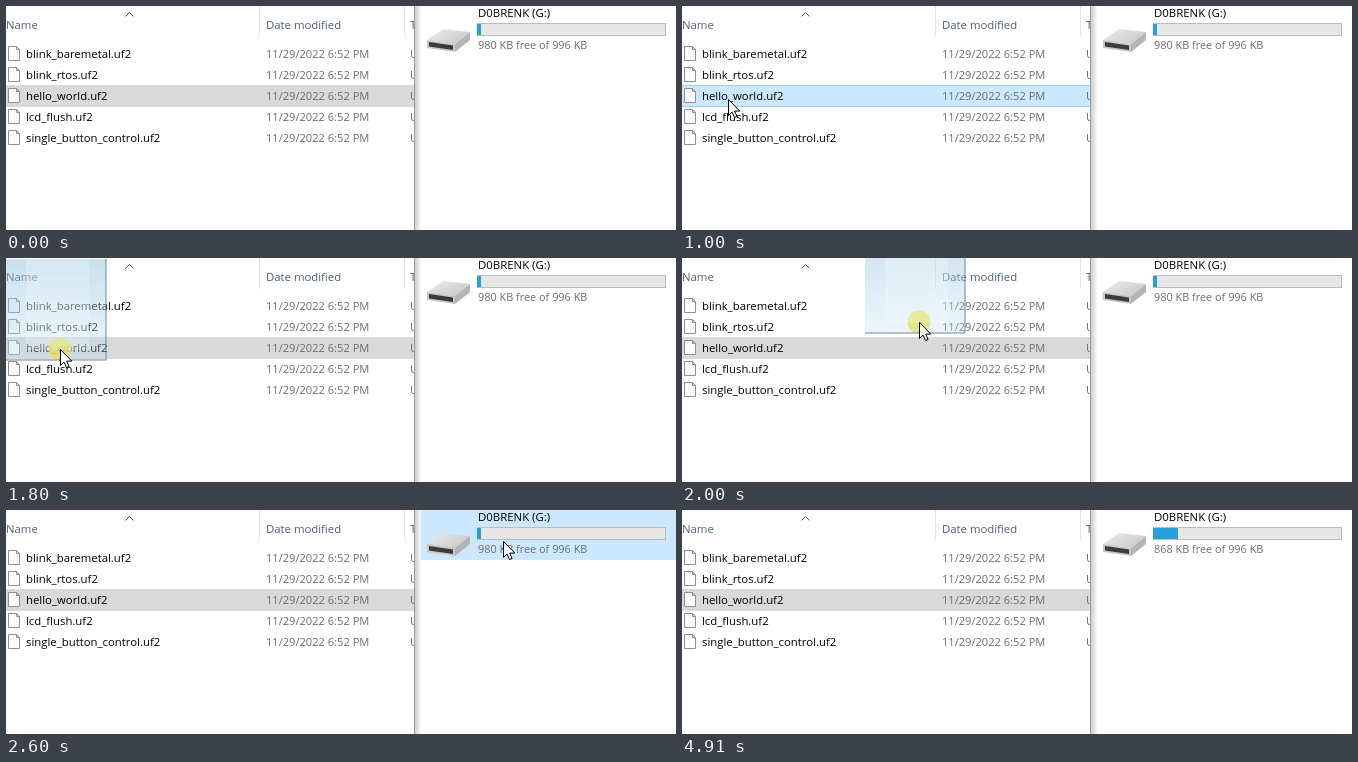
An HTML page with a canvas that plays this animation: 670x224 px, repeating every 5.91 s.

```html
<!DOCTYPE html>
<html lang="en">
<head>
<meta charset="utf-8">
<title>Copy a firmware file</title>
<style>
  html, body { margin: 0; width: 100%; height: 100%; overflow: hidden; background: #fff; }
  canvas { display: block; }
</style>
</head>
<body>
<canvas id="stage" width="670" height="224"></canvas>
<script>
const ctx = document.getElementById('stage').getContext('2d');
const LOOP = 5910, STEP = 100;
const SPLIT = 408, PANE = 415, ROW = 21;
const DRIVE = 'D0BRENK (G:)';
const FILES = ['blink_baremetal', 'blink_rtos', 'hello_world', 'lcd_flush', 'single_button_control'];
const GRAY = '#6d6d6d', HEADER = '#4c607a', SELECT = '#cce8ff';

const clamp = v => Math.min(1, Math.max(0, v));
const mix = (a, b, k) => a + (b - a) * k;

function rect(x, y, w, h, fill) {
  ctx.fillStyle = fill;
  ctx.fillRect(x, y, w, h);
}

function frame(x, y, w, h, color) {
  ctx.strokeStyle = color;
  ctx.lineWidth = 1;
  ctx.strokeRect(x + .5, y + .5, w - 1, h - 1);
}

function poly(points, fill, stroke) {
  ctx.beginPath();
  points.forEach(([x, y]) => ctx.lineTo(x, y));
  ctx.closePath();
  ctx.fillStyle = fill;
  ctx.fill();
  if (!stroke) return;
  ctx.strokeStyle = stroke;
  ctx.lineWidth = 1;
  ctx.stroke();
}

function shade(x0, y0, x1, y1, from, to) {
  const gradient = ctx.createLinearGradient(x0, y0, x1, y1);
  gradient.addColorStop(0, from);
  gradient.addColorStop(1, to);
  return gradient;
}

function text(str, x, y, color = '#000', size = 11.35) {
  ctx.font = `${size}px "Open Sans", "Noto Sans", sans-serif`;
  ctx.fillStyle = color;
  ctx.fillText(str, x, y);
  return ctx.measureText(str).width;
}

function fileIcon(x, y) {
  const w = 11, h = 14, fold = 3;
  ctx.save();
  ctx.translate(x + .5, y + .5);
  poly([[0, 0], [w - fold, 0], [w, fold], [w, h], [0, h]], '#fcfcfc', '#8e8e8e');
  poly([[w - fold, 0], [w - fold, fold], [w, fold]], '#e8e8e8', '#8e8e8e');
  ctx.restore();
}

function sortMark(x, y) {
  ctx.strokeStyle = '#555';
  ctx.lineWidth = 1;
  ctx.beginPath();
  ctx.moveTo(x - 4, y + 4);
  ctx.lineTo(x, y);
  ctx.lineTo(x + 4, y + 4);
  ctx.stroke();
}

function fileList(active) {
  ctx.save();
  ctx.beginPath();
  ctx.rect(0, 0, SPLIT, 224);
  ctx.clip();
  rect(253, 0, 1, 31, '#e5e5e5');
  rect(398, 0, 1, 31, '#e5e5e5');
  text('Name', 0, 23, HEADER);
  text('Date modified', 260, 23, HEADER);
  text('Type', 404, 23, HEADER);
  sortMark(123.5, 6.5);

  rect(0, 79, SPLIT, 22, active ? SELECT : '#d9d9d9');
  if (active) frame(-1, 79, SPLIT + 2, 22, '#99d1ff');
  FILES.forEach((name, i) => {
    const y = 48 + ROW * i;
    fileIcon(2, y - 8);
    text(name + '.uf2', 20, y + 4);
    text('11/29/2022 6:52 PM', 260, y + 4, GRAY, 11.1);
    text('UF2 File', 404, y + 4, GRAY);
  });
  ctx.restore();
}

function windowEdge() {
  rect(SPLIT, 0, PANE - SPLIT, 224, shade(SPLIT, 0, PANE, 0, '#c6c6c6', '#f8f8f8'));
  rect(SPLIT, 0, 1, 224, '#9c9c9c');
}

// A flat box in perspective with a dark slot in its front face.
function driveIcon() {
  const left = [421, 34], front = [449, 38], back = [464, 26];
  const drop = ([x, y], d) => [x, y + d];
  poly([left, [437, 23], back, front], shade(437, 23, 445, 38, '#e4e4e4', '#cfcfcf'));
  poly([front, back, drop(back, 8), drop(front, 8)], '#b4b4b4');
  poly([left, front, drop(front, 8), drop(left, 8)], '#c6c6c6');
  poly([[423, 36], [447, 39.5], [447, 44], [423, 40.5]], '#3c3c3c');
}

function drive(highlight, copied) {
  if (highlight) rect(PANE, 0, highlight - PANE, 50, SELECT);
  driveIcon();
  text(DRIVE, 472, 11, '#000', 11.4);
  rect(471, 17, 189, 13, '#e6e6e6');
  frame(471, 17, 189, 13, '#bcbcbc');
  const free = copied ? 868 : 980;
  rect(471, 18, 1 + Math.round(187 * (996 - free) / 996), 11, '#26a0da');
  text(`${free} KB free of 996 KB`, 472, 43, GRAY, 10.9);
}

function dragImage(x, y) {
  const w = 100, h = 101, left = x - 54, top = y - 90;
  rect(left, top, w, h, shade(0, top, 0, top + h, 'rgba(135,185,215,.45)', 'rgba(190,225,245,.32)'));
  rect(x - 34, top, 63, h - 10, 'rgba(245,250,252,.25)');
  rect(left + w - 1, top, 2, h, 'rgba(95,120,140,.45)');
  rect(left, top + h - 1, w, 2, 'rgba(95,120,140,.45)');
}

function copyTip(x, y) {
  const left = x + 8, top = y + 14;
  rect(left, top, 144, 20, '#fff');
  frame(left, top, 144, 20, '#767676');
  rect(left + 4, top + 9, 11, 2, '#1c3fa8');
  rect(left + 8.5, top + 4.5, 2, 11, '#1c3fa8');
  const lead = text('Copy to ', left + 20, top + 14, '#1f3f9a', 11.5);
  text(DRIVE, left + 20 + lead, top + 14, '#000', 11.5);
}

function clickSpot(x, y) {
  ctx.fillStyle = 'rgba(248,224,20,.8)';
  ctx.beginPath();
  ctx.arc(x, y, 11.5, 0, Math.PI * 2);
  ctx.fill();
}

function pointer(x, y) {
  ctx.save();
  ctx.translate(x + .5, y + .5);
  poly([[0, 0], [0, 16], [3.6, 12.6], [6, 18], [8.6, 17], [6.2, 11.6], [11.3, 11.6]], '#fff', '#000');
  ctx.restore();
}

// Enter from below, settle on the file, drag to the drive, leave downwards.
function pointerAt(t) {
  const pos = { x: 36, y: 164 };
  const glide = (start, length, x, y, power = 1) => {
    const k = clamp((t - start) / length) ** power;
    pos.x = mix(pos.x, x, k);
    pos.y = mix(pos.y, y, k);
  };
  glide(800, 200, 46, 93);
  glide(1000, 200, 54, 91);
  glide(1800, 400, 489, 26, 1.25);
  glide(2200, 100, 497, 31);
  glide(2600, 200, 512, 163);
  return [Math.round(pos.x), Math.round(pos.y)];
}

function render(time) {
  const t = Math.floor(time / STEP) * STEP;
  const [x, y] = pointerAt(t);
  const visible = t >= 800 && t < 2900;
  const pressed = t >= 1400 && t < 2500;
  const dragging = pressed && t >= 1700;
  const overDrive = visible && x > PANE && y < 50;

  rect(0, 0, 670, 224, '#fff');
  fileList(t >= 1000 && t < 1700);
  windowEdge();
  drive(overDrive && (dragging ? 665 : 670), time >= 4910);
  if (t >= 2700 && time < 3710) rect(669, 0, 1, 50, SELECT);

  if (!visible) return;
  if (pressed) clickSpot(x, y);
  if (dragging) dragImage(x, y);
  if (dragging && overDrive) copyTip(x, y);
  pointer(x, y);
}

const start = performance.now();
function tick() {
  render((performance.now() - start) % LOOP);
  requestAnimationFrame(tick);
}
tick();
</script>
</body>
</html>
```
